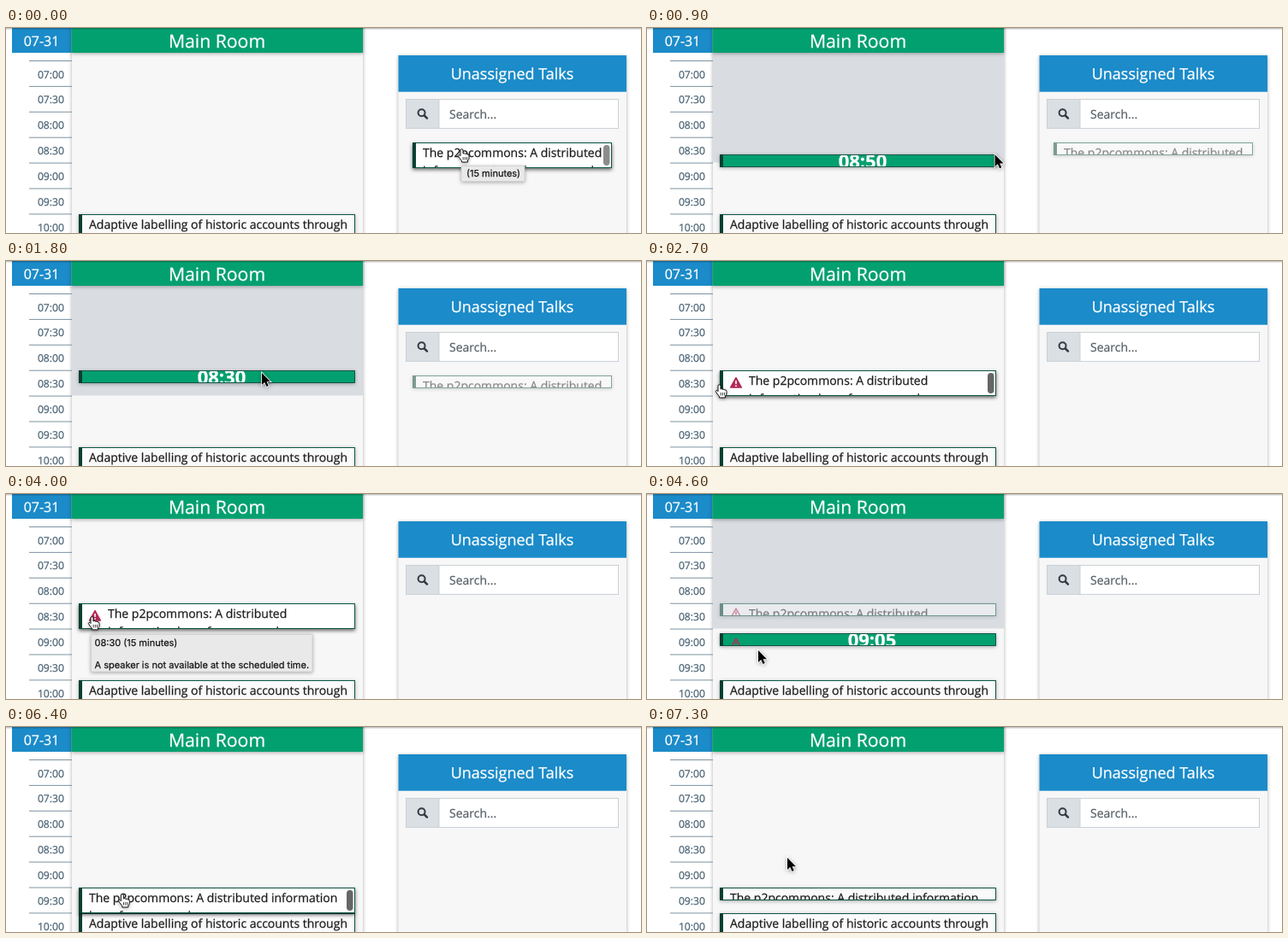
Recreate the animation shown at these times as an HTML page. Size 742 by 240 pixels, loop 7.4 s.

```html
<!DOCTYPE html>
<html lang="en">
<head>
<meta charset="utf-8">
<title>Schedule editor</title>
<style>
  html, body { margin: 0; width: 100%; height: 100%; overflow: hidden; background: #fff; }
  #stage { display: block; width: 742px; height: 240px; font: 14px "Open Sans", sans-serif; text-rendering: geometricPrecision; }
  text { fill: #1c1c1c; stroke: #1c1c1c; stroke-width: .25px; }
  .soft { filter: drop-shadow(0 1px 2px #0005); }
  .raised { filter: drop-shadow(0 2px 2px #0009); }
  .title { fill: #fff; stroke: #fff; text-anchor: middle; }
  .hour { fill: #4c6475; stroke: #4c6475; font-size: 12.2px; text-anchor: end; }
  .hint { fill: #596168; stroke: #596168; }
  .tip { font: 11px Inter, sans-serif; fill: #111; }
  .clock { font-size: 22px; font-weight: 700; }
</style>
</head>
<body>
<svg id="stage" viewBox="0 0 742 240">
  <defs>
    <linearGradient id="edge" x2="0" y2="1">
      <stop stop-color="#000" stop-opacity=".28"/>
      <stop offset="1" stop-color="#000" stop-opacity="0"/>
    </linearGradient>
  </defs>
  <rect class="soft" x="77" y="-5" width="340" height="260" fill="#f7f7f7"/>
  <rect id="blocked" x="77" y="29" width="340" height="128.5" fill="#d9dde2"/>
  <g id="hours"></g>
  <rect x="7" y="0" width="69.5" height="29" fill="#1b8bc9"/>
  <rect class="soft" x="76.5" y="-4" width="340.5" height="33" fill="#03a06f"/>
  <text class="title" x="41.5" y="20.5" font-size="16">07-31</text>
  <text class="title" x="246.5" y="23" font-size="21.2">Main Room</text>

  <rect class="soft" x="458.5" y="32" width="266.5" height="220" fill="#f7f7f7"/>
  <rect x="458.5" y="32" width="266.5" height="42.7" fill="#1b8bc9"/>
  <text class="title" x="591.5" y="60" font-size="18">Unassigned Talks</text>
  <rect x="467.5" y="83.5" width="248" height="34" fill="#fff" stroke="#c9d0d6"/>
  <path d="M467.5 83.5h38.5v34h-38.5z" fill="#dadfe4" stroke="#c9d0d6"/>
  <circle cx="485.6" cy="99.3" r="4" fill="none" stroke="#343a40" stroke-width="2"/>
  <path d="M488.8 102.5l3.2 3.2" stroke="#343a40" stroke-width="2.5" stroke-linecap="round"/>
  <text class="hint" x="518" y="105.5">Search...</text>

  <g id="scene"></g>
  <rect width="742" height="2.5" fill="url(#edge)"/>
</svg>
<script>
const LOOP = 7400, STEP = 100;
const ROOM = { x: 85, w: 323 }, PANEL = { x: 475, w: 233 };
const byId = id => document.getElementById(id);

// pointer path: time, x, y
const path = [
  [0, 532, 142], [400, 532, 142], [600, 518, 143], [1100, 346, 151], [1200, 339, 150],
  [1700, 300, 131], [2000, 296, 131], [2600, 84, 145], [2900, 84, 145], [3200, 100, 143],
  [4200, 100, 144], [4600, 130, 183], [4800, 130, 184], [5500, 130, 204],
  [6100, 130, 204], [6300, 132, 201], [6800, 164, 153], [7400, 164, 153]
];

function pointerAt(t) {
  const i = path.findIndex((p, k) => k && t <= p[0]);
  const [t0, x0, y0] = path[i - 1], [t1, x1, y1] = path[i];
  const u = (t - t0) / (t1 - t0), e = u * u * (3 - 2 * u);
  return { x: x0 + (x1 - x0) * e, y: y0 + (y1 - y0) * e };
}

const snap = y => 128 + 5 * Math.round((y - 128) / 5);

function clockAt(top) {
  const m = 510 + top - 128, pad = n => String(n).padStart(2, "0");
  return pad(Math.floor(m / 60)) + ":" + pad(m % 60);
}

function warning(outlined) {
  const tri = "M19 8.6L25.4 20H12.6Z";
  return outlined
    ? `<g transform="translate(0 -2.5)" fill="none" stroke="#c2264f">
       <path d="${tri}" stroke-width="1.3" stroke-linejoin="round"/><path d="M19 12v4" stroke-width="1.5"/></g>`
    : `<path d="${tri}" fill="#b32b57" stroke="#b32b57" stroke-width="1.5" stroke-linejoin="round"/>
       <path d="M19 12v4m0 1.3v1.6" stroke="#fff" stroke-width="1.6"/>`;
}

function card({ x, w }, top, { h = 15, lines = [], warn, hot, dim, clock, bar }) {
  const fill = clock ? "#03a06f" : hot ? "#fff" : "#fafafa";
  const textX = warn ? 34 : 12;
  const label = clock
    ? `<text class="title clock" x="${warn ? 178 : 167}" y="15.5">${clock}</text>`
    : lines.map((s, i) => `<text x="${textX}" y="${16.6 + i * 21}">${s}</text>`).join("");
  return `<g opacity="${dim ? .5 : 1}">
    <rect class="${hot ? "raised" : "soft"}" x="${x}" y="${top}" width="${w}" height="${h}" fill="${fill}"/>
    <svg x="${x}" y="${top}" width="${w}" height="${h - 1}">
      ${warn ? warning(dim || clock) : ""}${label}
      ${hot && bar ? `<rect x="${w - 10}" y="3" width="7.5" height="24" rx="3.7" fill="${bar}"/>` : ""}
    </svg>
    <rect x="${x + .5}" y="${top + .5}" width="${w - 1}" height="${h - 1}" fill="none" stroke="#0c5645"/>
    <rect x="${x}" y="${top}" width="4" height="${h}" fill="#043f31"/>
  </g>`;
}

function tooltip(x, y, w, h, rows, pad = 5) {
  return `<rect class="soft" x="${x}" y="${y}" width="${w}" height="${h}" fill="#e8e9e8" stroke="#cfcfcf" stroke-width=".7"/>` +
    rows.map(([s, dy]) => `<text class="tip" x="${x + pad}" y="${y + dy}">${s}</text>`).join("");
}

function cursor({ x, y }, hand) {
  return `<g class="soft" transform="translate(${x} ${y})">` + (hand
    ? `<g transform="translate(-4 -1)" stroke="#111"><path fill="#fff" d="M3 1.5Q4.5 0 6 1.5V6Q7.5 5 8.5 6.5Q10 5.5 11 7Q13 6.5 13 8.5V11Q13 13 11.5 14V16H4.5V14.5L1 10Q-.5 8 1 7.5Q2 7.3 3 8.7Z"/>
       <path d="M6.2 10v3.5M8.4 10v3.5M10.5 10v3.5" stroke-width=".8"/></g>`
    : `<path d="M0 0V14L3.2 11L5.5 16L7.8 15L5.6 10.2H10Z" fill="#000" stroke="#fff" stroke-width="1.6" paint-order="stroke"/>`) + "</g>";
}

const START = "The p2pcommons: A distributed";
const wrapped = [START, "information base for open and"];
const wide = [START + " information", "base for open and"];

function draw(t) {
  const p = pointerAt(t);
  const first = t >= 500 && t < 2000, second = t >= 4200 && t < 6100;
  const dragging = first || second;
  const warned = t >= 3500 && t < 4200;
  let out = "", hot = false;

  out += card(ROOM, 218, { h: 30, lines: ["Adaptive labelling of historic accounts through"] });
  if (t < 2000) {
    hot = !dragging;
    out += card(PANEL, 134, { h: hot ? 30 : 15, lines: wrapped, hot, dim: first, bar: "#8c8c8c" });
  } else {
    const top = t < 6100 ? 128 : 188, warn = top === 128;
    hot = !dragging && p.y >= top && p.y < top + 29;
    out += card(ROOM, top, {
      h: hot ? 30 : 15, lines: warn ? wrapped : wide, warn, hot, dim: second, bar: warned ? null : "#666"
    });
  }
  if (dragging && p.x < 417) {
    const top = snap(p.y - (first ? 2 : 18));
    out += card(ROOM, top, { clock: clockAt(top), warn: second });
  }
  if (t < 500) out += tooltip(532, 161.5, 74, 18, [["(15 minutes)", 12.7]], 6);
  if (warned) {
    out += tooltip(99.5, 164.5, 258.5, 43.5, [
      ["08:30 (15 minutes)", 13], ["A speaker is not available at the scheduled time.", 39.7]
    ], 4);
  }
  byId("scene").innerHTML = out + cursor(p, hot);
  byId("blocked").style.display = dragging ? "" : "none";
}

byId("hours").innerHTML = Array.from({ length: 7 }, (_, i) => {
  const y = 38.5 + i * 29.9;
  return `<path d="M27 ${y}H77" stroke="#7d93a1"/>
    <text class="hour" x="68" y="${y + 20}">${clockAt(38 + i * 30)}</text>`;
}).join("");

let shown = -1;
function tick() {
  const t = Math.floor(performance.now() % LOOP / STEP) * STEP;
  if (t !== shown) draw(shown = t);
  requestAnimationFrame(tick);
}
tick();
</script>
</body>
</html>
```
